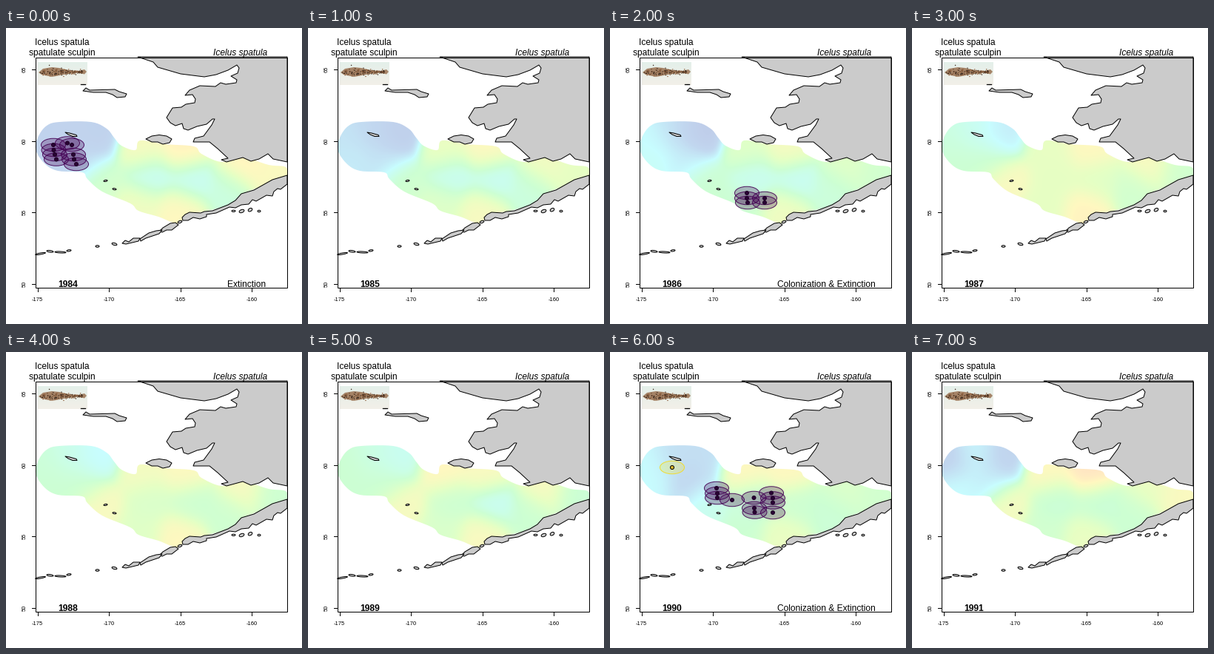
Write a matplotlib script that moves like this. It is 400 px wide and 400 px high and loops after 8 s.

```python
import numpy as np
import matplotlib.pyplot as plt
from matplotlib.animation import FuncAnimation
from matplotlib.colors import LinearSegmentedColormap
from matplotlib.patches import Ellipse, Polygon, Rectangle

SIZE, DPI = 400, 100
PX = 72 / DPI  # points per pixel
LEFT, RIGHT, TOP, BOTTOM = 39.5, 380, 39.5, 351
YEARS = range(1984, 1992)
PURPLE = (68 / 255, 1 / 255, 84 / 255)

plt.rcParams["font.family"] = "Liberation Sans"
fig = plt.figure(figsize=(SIZE / DPI, SIZE / DPI), dpi=DPI, facecolor="white")
ax = fig.add_axes([0, 0, 1, 1])
ax.axis("off")


def label(x, y, text, size=12, **kw):
    kw = {"ha": "center", "va": "baseline", "zorder": 9, **kw}
    return ax.text(x, y, text, fontsize=size * PX, color="black", **kw)


def line(xs, ys, width=1):
    ax.plot(xs, ys, color="black", lw=width * PX, zorder=8)


def smooth(points, steps=6):
    """Closed Catmull-Rom curve through the points."""
    b = np.array(points, float)[:, None]
    a, c, d = (np.roll(b, k, axis=0) for k in (1, -1, -2))
    t = np.linspace(0, 1, steps, endpoint=False)[None, :, None]
    curve = b + t / 2 * (c - a + t * (2 * a - 5 * b + 4 * c - d
                                      + t * (3 * (b - c) + d - a)))
    return curve.reshape(-1, 2)


def land(points):
    ax.add_patch(Polygon(points, fc="#cbcbcb", ec="black", lw=1 * PX,
                         joinstyle="round", zorder=3))


# Survey area
AREA = [
    (40, 164), (44, 146), (55, 132), (72, 127), (115, 127), (136, 136),
    (146, 148), (156, 159), (175, 165), (181, 152), (215, 157), (254, 160),
    (264, 170), (291, 181), (320, 175), (355, 185), (378, 188), (378, 201),
    (345, 214), (318, 225), (304, 238), (268, 248), (245, 251), (232, 264),
    (206, 255), (179, 247), (168, 237), (130, 221), (110, 204), (103, 195),
    (70, 193), (52, 183),
]

# Temperature stations and their level per year (0 cold, 6 warm)
STATIONS = np.array([
    (52, 150), (85, 140), (122, 145), (60, 180), (102, 178),
    (127, 208), (185, 162), (240, 163), (195, 200), (180, 240),
    (235, 247), (250, 205), (320, 183), (360, 192), (300, 218),
])
LEVELS = {
    1984: [.7, .8, .7, .9, 1, 3.3, 4.7, 5.3, 2.2, 4.4, 5, 2.2, 5.2, 4.8, 2.7],
    1986: [2, 1.2, .4, 2.2, 1.6, 3, 3.8, 4.6, 2.3, 3, 4.4, 2.2, 3.8, 3.2, 2.8],
    1987: [2.7, 2.3, 1.6, 3, 3, 4.8, 4.1, 5, 4, 4, 5.2, 3.8, 4.8, 3.2, 3.2],
    1989: [3, 2.6, 2.3, 3, 3, 4.7, 5.1, 4.8, 3, 3.5, 4.8, 2.2, 4.8, 2.9, 3],
    1990: [2, 1.2, 1.2, 2, .9, 2.4, 5, 5, 2.6, 3, 4.2, 3, 3.6, 3.2, 2.9],
    1991: [.6, 1.8, .8, 2.1, 1.6, 4.6, 5, 5.8, 2.8, 3.2, 4.2, 2.8, 4.2, 4.8, 3],
}
for year in (1985, 1988):
    LEVELS[year] = np.mean([LEVELS[year - 1], LEVELS[year + 1]], axis=0)

PALE = LinearSegmentedColormap.from_list("pale", [
    "#bec6e6", "#c2d8f0", "#c8fdff", "#cdffd3", "#e6ffc4", "#fff8c0", "#ffdfc4",
])
X0, X1, Y0, Y1 = 39, 380, 126, 266
gx, gy = np.meshgrid(np.arange(X0, X1) + .5, np.arange(Y0, Y1) + .5)
dist = (gx[..., None] - STATIONS[:, 0]) ** 2 + (gy[..., None] - STATIONS[:, 1]) ** 2
weights = np.exp(-dist / (2 * 18 ** 2)) + 1e-9
weights /= weights.sum(axis=-1, keepdims=True)
fields = {year: weights @ np.array(LEVELS[year]) for year in YEARS}

field = ax.imshow(fields[1984], cmap=PALE, vmin=0, vmax=6, aspect="auto",
                  extent=(X0, X1, Y1, Y0), interpolation="nearest", zorder=1)
field.set_clip_path(Polygon(smooth(AREA), transform=ax.transData))

# Land
NORTH = [
    (380, 39), (178, 39), (199, 46), (205, 53), (236, 62), (268, 66),
    (284, 63), (300, 57), (312, 50), (315, 54), (313, 61), (304, 65),
    (312, 70), (311, 74), (297, 76), (290, 74), (283, 79), (262, 78),
    (248, 84), (242, 91), (252, 90), (256, 96), (255, 101), (243, 103),
    (237, 107), (225, 108),
]
SOUTH = [
    (217, 121), (222, 128), (229, 132), (238, 129), (240, 136), (246, 138),
    (258, 133), (271, 130), (279, 123), (282, 123), (278, 131), (267, 146),
    (255, 149), (253, 154), (275, 154), (286, 163), (300, 176), (291, 178),
    (298, 181), (320, 175), (331, 180), (342, 177), (354, 170), (361, 177),
    (380, 181),
]
PENINSULA = [
    (380, 199), (360, 205), (335, 219), (318, 224), (310, 233), (300, 239),
    (279, 247), (268, 248), (263, 250), (248, 249), (242, 252), (238, 256),
    (239, 260), (246, 260), (253, 256), (262, 258), (271, 255), (271, 252),
    (284, 250), (302, 242), (310, 243), (318, 239), (328, 238), (333, 232),
    (338, 234), (352, 226), (360, 227), (362, 221), (367, 217), (371, 218),
    (380, 211),
]
LAWRENCE = [(104, 85), (108, 81), (113, 84), (147, 83), (153, 86), (163, 89),
            (161, 93), (150, 94), (144, 90), (135, 87), (118, 87)]
NUNIVAK = [(189, 150), (197, 146), (207, 144.5), (217, 146), (224, 150),
           (221, 155), (212, 157), (205, 154), (197, 154)]
MATTHEW = [(80, 141), (86, 142), (95, 144.5), (96, 146.5), (90, 146.5), (84, 144)]
UNALASKA = [(207, 275), (212, 270), (222, 264), (229, 263), (233, 266),
            (224, 273), (217, 273), (211, 276)]
UMNAK = [(181, 285), (193, 277), (203, 274), (211, 273), (207, 278),
         (189, 284), (182, 288)]
WESTERN = [(157, 291), (161, 287), (166, 289), (172, 284), (181, 284),
           (179, 288), (162, 292)]
# Islets: centre, length, height, tilt
ISLETS = [
    (134.5, 206.5, 5, 2, -10), (146.5, 217.7, 5, 2, 10), (146.5, 292, 7, 3, 15),
    (123.5, 295, 5, 2.5, 0), (85, 300.8, 6, 2.2, -8), (73.5, 303, 15, 2, 3),
    (59.5, 301.8, 9, 2.4, 8), (46.5, 305, 14, 2, -10), (235, 262, 6, 3, -20),
    (318.5, 247.5, 7, 4, -20), (330, 245.7, 6, 4, -30), (342, 247.5, 4, 2.5, 0),
    (307.5, 247.3, 5, 2.2, 0),
]
land(NORTH + SOUTH)
for shape in (PENINSULA, LAWRENCE, NUNIVAK, MATTHEW, UNALASKA, UMNAK, WESTERN):
    land(shape)
for x, y, w, h, tilt in ISLETS:
    ax.add_patch(Ellipse((x, y), w, h, angle=tilt, fc="#cbcbcb", ec="black",
                         lw=1 * PX, zorder=3))

# Frame and axes
ax.add_patch(Rectangle((LEFT, TOP), RIGHT - LEFT, BOTTOM - TOP, fill=False,
                       ec="black", lw=1 * PX, zorder=8))
for i in range(4):
    x, y = 42.5 + 96.5 * i, 345.5 - 96.5 * i
    line([x, x], [BOTTOM, BOTTOM + 5])
    line([LEFT, LEFT - 5], [y, y])
    label(x, 369, f"{-175 + 5 * i}", 7.5)
    label(25, y, f"{50 + 5 * i}", 7.5, rotation=90, va="center")

# Fish picture in flat shapes
ax.imshow(np.linspace(0, 1, 32).reshape(-1, 1), extent=(42, 110, 77, 46),
          cmap=LinearSegmentedColormap.from_list("water", ["#e4f0ea", "#f2efe8"]),
          aspect="auto", zorder=4)
FISH = [(44, 60), (50, 55), (62, 53), (72, 54), (85, 57), (98, 58), (106, 56),
        (109, 59), (106, 62.5), (98, 60.5), (84, 62), (62, 66), (48, 63)]
ax.add_patch(Polygon(FISH, fc="#a58468", ec="none", zorder=5))
rng = np.random.default_rng(4)
sx = rng.uniform(46, 104, 150)
sy = 59.3 + rng.normal(0, 1, 150) * np.interp(sx, [46, 60, 85, 104], [1.5, 3.2, 1.8, 1])
ax.scatter(sx, sy, s=1.1, c=rng.choice(["#3c2a1e", "#6b4a30", "#8a5a38"], 150),
           linewidths=0, zorder=6)
line([101, 103.5], [76, 76], 1.3)
line([104.5, 107], [76, 76], 1.3)

# Headings
label(76, 23, "Icelus spatula")
label(76, 37.5, "spatulate sculpin")
label(316.5, 37, "Icelus spatula", style="italic")
year_text = label(84, 350, "1984", weight="bold")
event_text = label(325, 350, "")

# Events
LOST = {
    1984: [(64, 158), (64.5, 165), (66, 171), (68, 177.5), (83, 155.5), (89, 158),
           (91, 171), (92, 177.5), (95, 184)],
    1986: [(185, 223), (185, 230), (186, 236), (209, 230), (209, 236)],
    1990: [(144, 184), (145, 191), (145, 197), (165, 200), (194.5, 197), (218, 190.5),
           (220, 197.5), (220, 203.5), (195, 211), (195.5, 216.5), (220, 217)],
}
FOUND = {1990: [(84, 156)]}
EVENTS = {1984: (325, "Extinction"),
          1986: (292.5, "Colonization & Extinction"),
          1990: (292.5, "Colonization & Extinction")}


def spot(x, y, fill, edge, dot, dot_edge):
    ring = Ellipse((x, y), 33, 17.5, fc=fill, ec=edge, lw=1 * PX, zorder=4)
    core = Ellipse((x, y), 5, 5, fc=dot, ec=dot_edge, lw=1 * PX, zorder=5)
    return [ax.add_patch(ring), ax.add_patch(core)]


spots = {year: [] for year in YEARS}
for year, places in LOST.items():
    for x, y in places:
        spots[year] += spot(x, y, (*PURPLE, .28), (*PURPLE, .9), "#2a0035", "#1c0024")
for year, places in FOUND.items():
    for x, y in places:
        spots[year] += spot(x, y, (.99, .91, .14, .25), "#f0dc32", "#d8b82c", "black")

ax.set_xlim(0, SIZE)
ax.set_ylim(SIZE, 0)


def update(i):
    now = YEARS[i]
    field.set_data(fields[now])
    year_text.set_text(str(now))
    x, text = EVENTS.get(now, (325, ""))
    event_text.set_text(text)
    event_text.set_x(x)
    for year, patches in spots.items():
        for patch in patches:
            patch.set_visible(year == now)


anim = FuncAnimation(fig, update, frames=len(YEARS), interval=1000,
                     init_func=lambda: update(0), repeat=True, repeat_delay=0)
plt.show()
```
